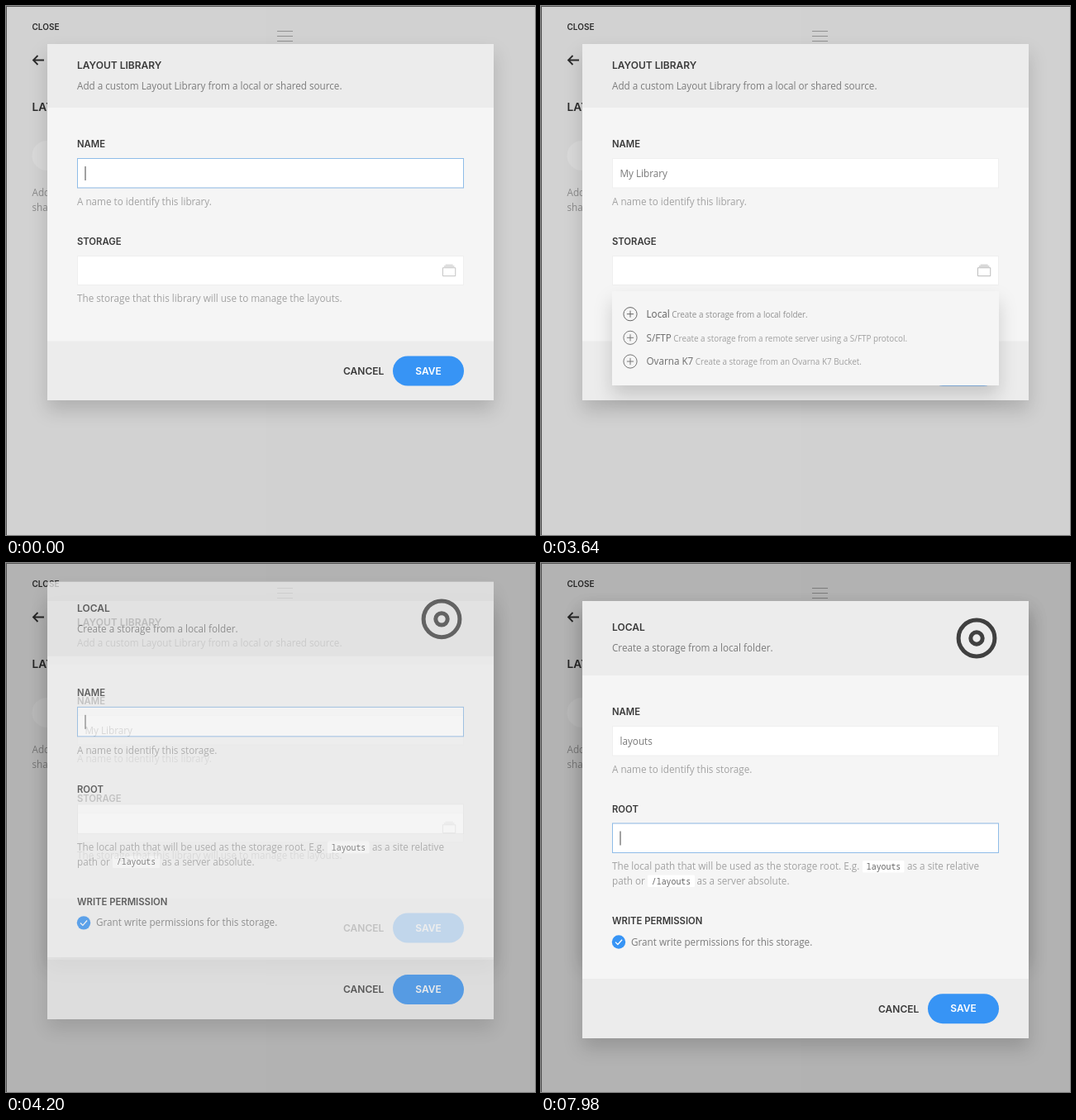
An HTML page that plays this animation: 640 by 640 pixels, repeating every 8 s.

```html
<!DOCTYPE html>
<html lang="en">
<head>
<meta charset="utf-8">
<title>Layout library dialog</title>
<style>
  html, body { margin: 0; width: 100%; height: 100%; overflow: hidden; background: #d0d0d0; }
  svg { display: block; width: 100vw; height: 100vh; }
  text { font: 400 11.7px "Open Sans", sans-serif; white-space: pre; }
  .title { font: 600 12px Inter, sans-serif; fill: #3a3a3a; }
  .label { font: 600 11.3px Inter, sans-serif; fill: #3a3a3a; }
  .close { font: 600 10px Inter, sans-serif; fill: #333; }
  .heading { font: 600 13.7px Inter, sans-serif; fill: #333; }
  .lead { fill: #7c7c7c; }
  .hint { fill: #a2a2a2; }
  .value { fill: #7a7a7a; }
  .small { font-size: 9.9px; }
  .code { font: 400 9.9px "Noto Sans Mono", monospace; fill: #666; }
  .raised { filter: drop-shadow(0 12.6px 11.25px rgba(0, 0, 0, .16)); }
</style>
</head>
<body>
<svg id="stage" viewBox="0 0 640 640"></svg>
<script>
const LOOP = 8000, STEP = 70;
const stage = document.getElementById('stage');

const text = (x, y, cls, str, extra = '') => `<text x="${x}" y="${y}" class="${cls}" ${extra}>${str}</text>`;
const rect = (x, y, w, h, fill, extra = '') =>
  `<rect x="${x}" y="${y}" width="${w}" height="${h}" fill="${fill}" ${extra}/>`;
const path = (d, color, width) => `<path d="${d}" fill="none" stroke="${color}" stroke-width="${width}"/>`;

const field = (id, y) => rect(86.5, y + .5, 467, 35.5, '#fff', 'stroke="#efefef"') +
  `<rect id="${id}Focus" x="86.5" y="${y + .5}" width="467" height="35.5" fill="none" stroke="#8fbce8"/>` +
  text(95.5, y + 22.8, 'value', '', `id="${id}Value"`) +
  rect(95.5, y + 10, 1, 17, '#444', `id="${id}Caret"`);

const panel = (headerEnd, footerStart, end) =>
  rect(50, 46, 540, end - 46, '#f5f5f5', 'class="raised"') +
  rect(50, 46, 540, headerEnd - 46, '#ececec') +
  rect(50, footerStart, 540, end - footerStart, '#ececec');

const buttons = y => text(408, y + 4.4, 'title', 'CANCEL') +
  rect(468, y - 18, 86, 36, '#3794f5', 'rx="18"') +
  text(511, y + 4.2, 'title', 'SAVE', 'text-anchor="middle" style="fill:#fff"');

const item = (id, y, name, about) => `<g id="${id}">
  <g fill="none" stroke="currentColor"><circle cx="108" cy="${y}" r="8.1"/>
  <path d="M103.9 ${y}h8.2M108 ${y - 4.1}v8.2"/></g>
  <text x="127.5" y="${y + 4.2}" class="name">${name}<tspan class="small about"> ${about}</tspan></text></g>`;

const code = (x, y, w, str) => rect(x, y - 11, w, 14.5, '#fff', 'rx="1.5"') + text(x + 4.8, y, 'code', str);

const page = rect(0, 0, 640, 640, '#f5f5f5') + rect(0, 0, 315, 640, '#f7f7f7') +
  text(31.5, 28.7, 'close', 'CLOSE') +
  path('M46 65.5H33M38.5 60l-5.5 5.5 5.5 5.5', '#333', 1.8) +
  text(31.5, 127, 'heading', 'LAYOUT LIBRARIES') +
  rect(31.5, 163, 120, 36, '#fff', 'rx="18"') +
  text(31.5, 230, 'hint', 'Add a custom library from a') + text(31.5, 247.7, 'hint', 'shared source.') +
  path('M328 30.5h19M328 36.5h19M328 42.5h19', '#aaa', 1) +
  rect(0, 0, 640, 640, '#000', 'opacity=".15"');

const library = panel(123, 405.5, 477) +
  text(86, 76.3, 'title', 'LAYOUT LIBRARY') +
  text(86, 100.9, 'lead', 'Add a custom Layout Library from a local or shared source.') +
  text(86, 171.2, 'label', 'NAME') + field('library', 184) +
  text(86, 241, 'hint', 'A name to identify this library.') +
  text(86, 288.9, 'label', 'STORAGE') + rect(86.5, 302.5, 467, 35, '#fff', 'stroke="#efefef"') +
  `<g id="picker" transform="translate(527.1 310.9) scale(.9)">
    <path d="M5 2h10v1H5zM3 4h14v1H3z" fill="currentColor"/>
    <path d="M1.5 6.5h17v11h-17z" fill="none" stroke="currentColor"/></g>` +
  text(86, 358.2, 'hint', 'The storage that this library will use to manage the layouts.') +
  buttons(441.5) +
  `<g id="menu">${rect(86, 345, 468, 114, '#f5f5f5', 'class="raised"')}
    ${item('local', 372.7, 'Local', 'Create a storage from a local folder.')}
    ${item('sftp', 401.3, 'S/FTP', 'Create a storage from a remote server using a S/FTP protocol.')}
    ${item('cloud', 430, 'Ovarna K7', 'Create a storage from an Ovarna K7 Bucket.')}</g>`;

const storage = panel(136, 503, 575) +
  text(86, 82.4, 'title', 'LOCAL') + text(86, 107.1, 'lead', 'Create a storage from a local folder.') +
  `<g fill="none" stroke="#404040" stroke-width="5"><circle cx="527" cy="91" r="21.9"/><circle cx="527" cy="91" r="7.2"/></g>` +
  text(86, 184.2, 'label', 'NAME') + field('name', 197) +
  text(86, 253.8, 'hint', 'A name to identify this storage.') +
  text(86, 301.6, 'label', 'ROOT') + field('root', 314.5) +
  text(86, 371.2, 'hint', 'The local path that will be used as the storage root. E.g.') + code(389, 371, 50.5, 'layouts') +
  text(443, 371.2, 'hint', 'as a site relative') +
  text(86, 388.8, 'hint', 'path or') + code(129, 388.6, 57, '/layouts') +
  text(188.5, 388.8, 'hint', 'as a server absolute.') +
  text(86, 436.9, 'label', 'WRITE PERMISSION') +
  '<circle cx="94" cy="458.5" r="8.2" fill="#3794f5"/>' + path('M90 458.6l2.9 2.9 5.2-5.8', '#fff', 1.3) +
  text(109, 462.6, 'lead', 'Grant write permissions for this storage.') +
  buttons(539.2);

stage.innerHTML = page + `<g>${library}</g>` +
  rect(0, 0, 640, 640, '#000', 'id="shade"') + `<g id="storage">${storage}</g>` +
  path('M0 .5H640M.5 0V640', '#555', 1);

const el = id => document.getElementById(id);
const clamp = v => Math.min(1, Math.max(0, v));
const within = (t, a, b) => t >= a && t < b;
const grey = v => `rgb(${v},${v},${v})`;

// Progress of a short transition whose first visible step is at `start`.
const fade = (t, start, steps) => clamp((t - start + STEP) / (steps * STEP));

// Toggles at each listed time, beginning switched on.
const blink = (t, toggles) => toggles.filter(at => t >= at).length % 2 === 0;

const typed = t => {
  const keys = [[6020, 1], [6160, 2], [6230, 3], [6440, 5], [6510, 6], [6720, 7]];
  const last = keys.filter(([at]) => t >= at).pop();
  return 'layouts'.slice(0, last ? last[1] : 0);
};

function setField(id, value, focus, caret) {
  const label = el(id + 'Value'), bar = el(id + 'Caret');
  if (label.textContent !== value) label.textContent = value;
  el(id + 'Focus').setAttribute('opacity', focus);
  bar.setAttribute('x', value ? Math.round(95 + label.getComputedTextLength()) + .5 : 95.5);
  bar.setAttribute('opacity', caret ? 1 : 0);
}

function tint(id, icon, name, about) {
  const g = el(id);
  g.style.color = grey(icon);
  g.querySelector('.name').style.fill = grey(name);
  g.querySelector('.about').style.fill = grey(about);
}

function render(time) {
  const t = Math.floor(time / STEP) * STEP;

  setField('library', t >= 490 ? 'My Library' : '', 1 - fade(t, 2660, 2),
    t < 2310 && blink(t, [280, 490, 1050, 1540, 2030]));
  el('picker').style.color = grey(t < 2310 ? 190 : 130 + 50 * fade(t, 3150, 3));
  el('menu').setAttribute('display', within(t, 2590, 3990) ? 'inline' : 'none');
  const hover = fade(t, 3640, 3);
  tint('local', 120 - 50 * hover, 110 - 45 * hover, 160 - 45 * hover);
  tint('sftp', 120, 110, 160);
  tint('cloud', 120, 110, 160);

  const enter = t >= 4270 ? 1 : clamp((t - 3923) / 373);
  el('shade').setAttribute('opacity', .15 * clamp(enter * 2));
  el('storage').setAttribute('opacity', enter);
  el('storage').setAttribute('transform', `translate(0 ${-90 * (1 - enter)})`);

  const moved = fade(t, 7770, 4);
  setField('name', typed(t), 1 - moved, t < 7770 && blink(t, [4550, 5040, 5530, 6020, 7280]));
  setField('root', '', moved, t >= 7770);
}

const begin = performance.now();
(function tick() {
  render((performance.now() - begin) % LOOP);
  requestAnimationFrame(tick);
})();
</script>
</body>
</html>
```
